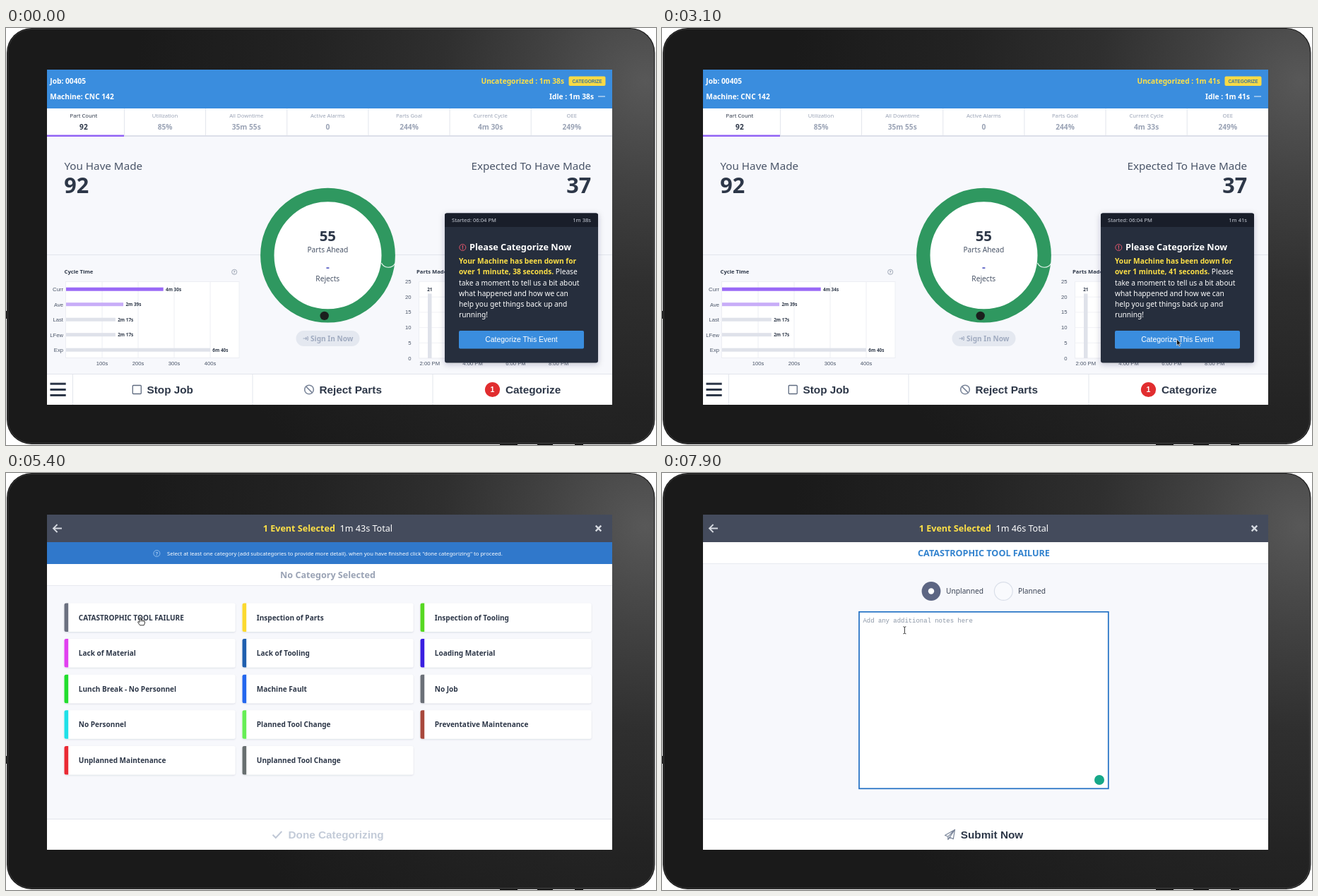
These frames come from a looping animation (920x591 px, 8000 ms). An HTML page:

```html
<!DOCTYPE html>
<html lang="en">
<head>
<meta charset="utf-8">
<title>Machine downtime panel</title>
<style>
  html, body { margin: 0; width: 100%; height: 100%; overflow: hidden; background: #fff; }
  svg { display: block; width: 920px; height: 591px; }
  text { font-family: "Noto Sans", "Open Sans", sans-serif; white-space: pre; }
  .sans { font-family: "Liberation Sans", Arial, sans-serif; }
  .mono { font-family: "Liberation Mono", "Courier New", monospace; }
</style>
</head>
<body>
<svg id="stage" viewBox="0 0 920 591" xmlns="http://www.w3.org/2000/svg"></svg>
<script>
const LOOP = 8000;
const AT = { loader: 3600, list: 4150, notes: 5900, focus: 7150, badge: 7450 };
const INK = '#2d3748', SLATE = '#4a5568', PALE = '#9aa3b5', BLUE = '#3a8dde', YELLOW = '#fde047';
const RULE = '#e2e5ec', BACK = '#f7f8fc';

// Shape helpers
const rect = (x, y, x2, y2, fill, extra = '') =>
  `<rect x="${x}" y="${y}" width="${x2 - x}" height="${y2 - y}" fill="${fill}" ${extra}/>`;
const dot = (x, y, r, fill, extra = '') => `<circle cx="${x}" cy="${y}" r="${r}" fill="${fill}" ${extra}/>`;
const line = (d, stroke, w = 1, extra = '') =>
  `<path d="${d}" fill="none" stroke="${stroke}" stroke-width="${w}" ${extra}/>`;
const text = (x, y, s, size, fill, o = {}) =>
  `<text x="${x}" y="${y}" font-size="${size}" fill="${fill}" font-weight="${o.w || 400}"` +
  ` text-anchor="${o.a || 'start'}" class="${o.f || ''}"${o.k ? ` data-k="${o.k}"` : ''}>${s}</text>`;
const group = (id, body) => `<g id="${id}">${body}</g>`;
const bold = { w: 700 }, mid = { a: 'middle' }, end = { a: 'end' };
const boldMid = { w: 700, a: 'middle' }, boldEnd = { w: 700, a: 'end' };
const sansBold = { w: 700, f: 'sans' };

const defs = `<defs>
  <radialGradient id="bezel" gradientUnits="userSpaceOnUse" cx="905" cy="75" r="720">
    <stop offset="0" stop-color="#585858"/><stop offset=".2" stop-color="#424242"/>
    <stop offset=".4" stop-color="#2f2f2f"/><stop offset=".65" stop-color="#232323"/>
    <stop offset="1" stop-color="#1a1a1a"/>
  </radialGradient>
  <linearGradient id="rim" x1="0" x2="1"><stop offset="0" stop-color="#3a3a3a"/><stop offset="1" stop-color="#4c4c4c"/></linearGradient>
  <filter id="soft" x="-20%" y="-20%" width="140%" height="140%">
    <feDropShadow dx="0" dy="1" stdDeviation="1" flood-color="#1a2440" flood-opacity=".13"/></filter>
  <filter id="deep" x="-20%" y="-20%" width="140%" height="140%">
    <feDropShadow dx="0" dy="2" stdDeviation="4" flood-color="#1a2440" flood-opacity=".25"/></filter>
  <clipPath id="screen"><rect x="58" y="59" width="800" height="475"/></clipPath>
</defs>`;

function tablet() {
  return [[699, 724], [752, 774], [805, 817]].map(([a, b]) => rect(a, 588, b, 591, '#161616')).join('') +
    rect(0, 401, 2, 412, '#222') +
    rect(1, 0, 918.5, 590, '#151515', 'rx="35"') +
    rect(2.5, 1.5, 917, 588.5, 'url(#bezel)', 'rx="33.5" stroke="url(#rim)"');
}

function footer(body) {
  return rect(58, 490, 858, 534, '#fff') + line('M58 490.5H858', RULE) + body;
}

const helpIcon = (x, y, r, c) => dot(x, y, r, 'none', `stroke="${c}" stroke-width=".8"`) +
  text(x, y + r * .6, '?', r * 1.6, c, boldMid);

function tabs() {
  const items = [['Part Count', '92'], ['Utilization', '85%'], ['All Downtime', '35m 55s'], ['Active Alarms', '0'],
    ['Parts Goal', '244%'], ['Current Cycle', '', 'cycle'], ['OEE', '249%']];
  return rect(58, 114, 858, 153, '#fff') + rect(58, 152, 858, 154, '#dcdfe9') +
    items.map(([name, val, k], i) => {
      const x = 109.9 + i * 115.15;
      return (i ? line(`M${x - 57.6} 114V152`, RULE) : '') +
        text(x, 127, name, 7.7, i ? PALE : INK, { w: 500, a: 'middle' }) +
        text(x, 144, val, 10.2, i ? PALE : INK, { w: i ? 600 : 700, a: 'middle', k });
    }).join('') + rect(58, 151.5, 167, 154, '#9163f5');
}

const secX = s => 85 + s * .51;

function cycleChart() {
  const rows = [['Curr', 270, '#9a69f6', ''], ['Ave', 159, '#c8adf8', '2m 39s'], ['Last', 137, '#dfe2ea', '2m 17s'],
    ['LFew', 137, '#dfe2ea', '2m 17s'], ['Exp', 400, '#dfe2ea', '6m 40s']];
  return text(82.5, 348, 'Cycle Time', 7.66, INK, bold) + helpIcon(323.2, 345.8, 3.6, '#8a93a5') +
    rect(84.5, 359.5, 330, 467.5, '#fff', `stroke="#eceef3"`) +
    [100, 200, 300, 400].map(s => line(`M${secX(s)} 359V468`, '#eceef3') +
      text(secX(s), 477.5, s + 's', 7.66, SLATE, { a: 'middle', f: 'sans' })).join('') +
    rows.map(([name, s, c, label], i) => {
      const y = 370.2 + i * 21.5;
      return text(81, y + 2.8, name, 7.66, SLATE, { a: 'end', f: 'sans' }) +
        rect(85, y - 2.5, secX(s), y + 2.5, c, i ? '' : 'id="curBar"') +
        text(secX(s) + 3.3, y + 2.4, label, 6.4, INK, { w: 700, k: i ? '' : 'cur' });
    }).join('');
}

function partsChart() {
  const axis = { a: 'end', f: 'sans' };
  return text(581, 348, 'Parts Made', 7.66, INK, bold) + rect(584.5, 359.5, 829, 468, '#fff', 'stroke="#eceef3"') +
    [25, 20, 15, 10, 5, 0].map((n, i) => text(573.5, 362 + i * 21.7, n, 7.66, SLATE, axis) +
      line(`M584.5 ${359.5 + i * 21.7}H829`, '#f1f2f6')).join('') +
    rect(597, 376.5, 602.5, 468, '#dfe2ea') + text(599.8, 373, '21', 6.4, INK, boldMid) +
    [2, 4, 6, 8].map((h, i) => text(599.8 + i * 60.8, 478.3, h + ':00 PM', 7.66, SLATE, { a: 'middle', f: 'sans' })).join('');
}

function gauge() {
  return dot(455.5, 322.2, 85.7, '#fff', 'stroke="#2f9860" stroke-width="19.4"') +
    line('M531.5 333Q534 339 541 339.3Q548 339 550.3 334', '#e8f5ee', 1.1) +
    dot(450.7, 407.9, 6.2, '#1b1f1d') +
    text(455.3, 302, '55', 20.4, INK, boldMid) + text(455.3, 318.4, 'Parts Ahead', 10.2, SLATE, mid) +
    text(455.3, 343.5, '-', 15, '#5a5fc4', boldMid) + text(455.3, 359.2, 'Rejects', 10.2, SLATE, mid) +
    rect(410.5, 429, 500.5, 451, '#e4e8f0', 'rx="11"') +
    line('M420.5 440H424.5M424.5 438.2V441.8L426.3 440ZM426 437.6H427.3V442.4H426', '#a0abc0', 1) +
    text(431, 443.7, 'Sign In Now', 10.1, '#a0abc0', { w: 600 });
}

function popup() {
  const rows = ['take a moment to tell us a bit about', 'what happened and how we can',
    'help you get things back up and', 'running!'];
  return rect(621, 262.5, 838, 474.5, '#252d3c', 'rx="3" filter="url(#deep)"') +
    `<path d="M621 282V265.5a3 3 0 0 1 3-3H835a3 3 0 0 1 3 3V282Z" fill="#191e2a"/>` +
    text(631, 275.2, 'Started: 06:04 PM', 7.6, '#c9ced8') + text(828, 275.2, '', 7.6, '#c9ced8', { a: 'end', k: 'down' }) +
    dot(646.3, 311, 4.5, 'none', 'stroke="#e0566b"') + text(646.3, 314, '!', 8, '#e0566b', boldMid) +
    text(656, 314.8, 'Please Categorize Now', 12.7, '#fff', bold) +
    text(641, 334, 'Your Machine has been down for', 10.2, YELLOW, bold) +
    `<text x="641" y="349.2" font-size="10.2"><tspan data-k="long" fill="${YELLOW}" font-weight="700"></tspan>` +
    `<tspan fill="#fff"> Please</tspan></text>` +
    rows.map((s, i) => text(641, 364.5 + i * 15.25, s, 10.2, '#fff')).join('') +
    rect(641, 429, 818, 454.5, BLUE, 'rx="2"') +
    text(729.5, 445, 'Categorize This Event', 10.45, '#fff', { a: 'middle', f: 'sans' });
}

function dashboard() {
  return rect(58, 59, 858, 534, BACK) + rect(58, 59, 858, 114, BLUE) +
    text(62.3, 79, 'Job: 00405', 10.2, '#fff', bold) + text(62.3, 100.8, 'Machine: CNC 142', 10.2, '#fff', bold) +
    text(790, 79, '', 10.2, YELLOW, { ...boldEnd, k: 'uncat' }) + text(832, 100.8, '', 10.2, '#fff', { ...boldEnd, k: 'idle' }) +
    rect(796.5, 68.5, 848.5, 82, '#f8da46', 'rx="2"') +
    text(822.5, 77.5, 'CATEGORIZE', 6.5, '#3c759c', { w: 700, a: 'middle', f: 'sans' }) +
    line('M838 97H848', '#cfe3f8', 1.2) + tabs() + line('M58 321.5H858', RULE) +
    text(82.5, 200.6, 'You Have Made', 15.2, SLATE) + text(82.3, 234, '92', 30.6, INK, bold) +
    text(828.2, 200.6, 'Expected To Have Made', 15.2, SLATE, end) + text(828.3, 234, '37', 30.6, INK, boldEnd) +
    cycleChart() + partsChart() + gauge() + popup() +
    footer(
      line('M94.5 491V534M349 491V534M604 491V534', RULE) +
      line('M62.5 504.3H84.7M62.5 512.4H84.7M62.5 520.4H84.7', INK, 3) +
      rect(179.3, 506.5, 191.3, 518.5, 'none', 'rx="1" stroke="#5f6b80" stroke-width="1.3"') +
      text(199.5, 517.5, 'Stop Job', 15.3, INK, sansBold) +
      dot(429, 512.5, 6.3, 'none', 'stroke="#7b869a" stroke-width="1.6"') + line('M424.6 508.1L433.4 516.9', '#7b869a', 1.6) +
      text(443.5, 517.5, 'Reject Parts', 15.3, INK, sansBold) +
      dot(688.5, 512.5, 10.6, '#e12d2f') + text(688.5, 516.3, '1', 10.5, '#fff', { ...sansBold, a: 'middle' }) +
      text(707, 517.5, 'Categorize', 15.3, INK, sansBold));
}

function loader() {
  let dots = '';
  for (let i = 0; i < 8; i++) {
    const a = (i * 45 - 90) * Math.PI / 180;
    if (i !== 1) dots += dot(455.3 + 16.4 * Math.cos(a), 297.3 + 16.4 * Math.sin(a), 3.8, '#a482fb');
  }
  return rect(58, 59, 858, 534, '#fefefe') + group('spin', dots);
}

function topBar() {
  return rect(58, 59, 858, 98, '#444b5c') +
    line('M79 78.5H67.5M72.6 73L67 78.5L72.6 84', '#d5d9e0', 1.8) +
    line('M834.7 74.7L842.3 82.3M842.3 74.7L834.7 82.3', '#d5d9e0', 2.4) +
    text(363.7, 83, '1 Event Selected', 12.6, YELLOW, bold) + text(472.5, 83, '', 12.6, '#fff', { w: 500, k: 'total' });
}

const cards = [['CATASTROPHIC TOOL FAILURE', '#6b7080'], ['Inspection of Parts', '#fbd92f'], ['Inspection of Tooling', '#57d822'],
  ['Lack of Material', '#e040f0'], ['Lack of Tooling', '#1f5fae'], ['Loading Material', '#3a1fe0'],
  ['Lunch Break - No Personnel', '#22dd2e'], ['Machine Fault', '#2467ee'], ['No Job', '#6b7078'],
  ['No Personnel', '#1fe0e8'], ['Planned Tool Change', '#66ee55'], ['Preventative Maintenance', '#a8483c'],
  ['Unplanned Maintenance', '#ea2a34'], ['Unplanned Tool Change', '#686f70']]
  .map(([name, color], i) => ({ name, color, x: 82.5 + i % 3 * 252, y: 184.5 + Math.floor(i / 3) * 50.6 }));

function list() {
  return rect(58, 59, 858, 534, BACK) + topBar() + rect(58, 98, 858, 129, '#3078cb') +
    helpIcon(213.4, 114, 4.5, '#a5cdf5') +
    text(465.4, 116.5, 'Select at least one category (add subcategories to provide more detail). when you have finished click "done categorizing" to proceed.',
      7.66, '#fff', { w: 500, a: 'middle' }) +
    rect(58, 129, 858, 159, '#fff') + line('M58 159.5H858', '#e8eaf0') +
    text(455.5, 148.6, 'No Category Selected', 12.6, PALE, boldMid) +
    cards.map(c => rect(c.x, c.y, c.x + 242, c.y + 40.5, '#fff', 'rx="2.5" filter="url(#soft)"') +
      `<path d="M${c.x + 5.7} ${c.y}v40.5h-3.2a2.5 2.5 0 0 1-2.5-2.5v-35.5a2.5 2.5 0 0 1 2.5-2.5z" fill="${c.color}"/>` +
      text(c.x + 20.3, c.y + 24, c.name, 10.05, INK, { w: 600 })).join('') +
    footer(line('M377.5 512.8L381.8 517L390.3 508', '#c0c8d6', 2) +
      text(399.5, 517.5, 'Done Categorizing', 15.3, '#c3cbd8', sansBold));
}

function notes() {
  return rect(58, 59, 858, 534, BACK) + topBar() + rect(58, 98, 858, 128, '#fff') + line('M58 128.5H858', '#e8eaf0') +
    text(455.5, 118, 'CATASTROPHIC TOOL FAILURE', 12.6, '#3182ce', boldMid) +
    dot(381, 167.5, 13.4, '#5d6683') + dot(381, 167.5, 4.2, '#fff') +
    dot(483.3, 167.5, 12.9, '#f9fafd', 'stroke="#dadfe9" stroke-width="1.2"') +
    text(402, 171, 'Unplanned', 10.2, '#3a4354') + text(504, 171, 'Planned', 10.2, '#3a4354') +
    rect(279, 196.8, 631.8, 447.3, '#fff', 'id="area" stroke="#d5d9e2"') +
    text(284.5, 212, 'Add any additional notes here', 8.93, '#8b96a6', { f: 'mono' }) +
    group('badge', dot(619, 435, 7, '#16a888')) +
    footer(line('M400.5 513.5L414.5 505.5L412.3 518.6L407 516.3L404.8 519.6V515.3ZM404.8 515.3L414.5 505.5L407 516.3', '#7b869a', 1.2, 'stroke-linejoin="round"') +
      text(422.8, 517.5, 'Submit Now', 15.3, INK, sansBold));
}

// Pointers, drawn with the hot spot at 0,0
const pointers =
  group('arrow', `<path d="M0 0V8.9L2.1 7L3.5 10.2L5 9.6L3.6 6.4H6.3Z" fill="#111" stroke="#fff" stroke-width=".7"/>`) +
  group('hand', `<path d="M-1 1Q0-.6 1 1V4.2Q2.2 3.4 3 4.4Q4.2 3.8 4.8 4.9Q6.4 4.5 6.4 6V8.5L5.2 11.3H-.4L-3.2 7.4Q-3.6 5.8-2.2 6L-1 7.2Z" fill="#fff" stroke="#222" stroke-width=".9"/>` +
    line('M1 4V6.5M3 4.5V6.5M4.8 5V6.8', '#222', .6)) +
  group('beam', line('M-2-5Q0-5 0-4Q0-5 2-5M0-4V4M-2 5Q0 5 0 4Q0 5 2 5', '#222', .9));

const pages = { dashboard, loader, list, notes };
const stage = document.getElementById('stage');
stage.innerHTML = defs + tablet() + `<g clip-path="url(#screen)">` +
  Object.entries(pages).map(([id, make]) => group(id, make())).join('') + group('cursor', pointers) + '</g>';

const el = id => document.getElementById(id);
const show = (id, on) => el(id).setAttribute('display', on ? 'inline' : 'none');
const put = (k, s) => stage.querySelectorAll(`[data-k="${k}"]`).forEach(n => {
  if (n.textContent !== s) n.textContent = s;
});
const clock = s => `${Math.floor(s / 60)}m ${s % 60}s`;

// Pointer path: start, end, from x, y, to x, y, upward bend
const moves = [
  [750, 1600, 862, 400, 726, 438, 0],
  [2250, 2600, 726, 438, 728.5, 441, 0],
  [4210, 5065, 728.5, 441, 190, 204.5, 9],
  [6450, 7050, 190, 204.5, 343.4, 222.8, 0]
];

function pointerAt(t) {
  const m = moves.filter(v => t >= v[0]).pop() || moves[0];
  const u = Math.min(1, Math.max(0, (t - m[0]) / (m[1] - m[0]))), e = u * u * (3 - 2 * u);
  return [m[2] + (m[4] - m[2]) * e, m[3] + (m[5] - m[3]) * e - m[6] * 4 * u * (1 - u)];
}

function draw(t) {
  const page = t < AT.loader ? 'dashboard' : t < AT.list ? 'loader' : t < AT.notes ? 'list' : 'notes';
  for (const id in pages) show(id, id === page);

  const ticks = Math.floor((t + 200) / 1000), down = 98 + ticks, cur = 270 + Math.floor((t + 900) / 1000);
  put('uncat', 'Uncategorized : ' + clock(down));
  put('idle', 'Idle : ' + clock(down));
  put('down', clock(down));
  put('long', `over 1 minute, ${down - 60} seconds.`);
  put('total', clock(down) + ' Total');
  put('cycle', clock(270 + ticks));
  put('cur', clock(cur));
  el('curBar').setAttribute('width', secX(cur) - 85);
  stage.querySelector('[data-k="cur"]').setAttribute('x', secX(cur) + 3.3);

  // The spinner turns in eighths from the moment it appears
  el('spin').setAttribute('transform', `rotate(${Math.floor((t - AT.loader) / 125) * 45} 455.3 297.3)`);

  const focus = t >= AT.focus;
  el('area').setAttribute('stroke', focus ? '#2170c4' : '#d5d9e2');
  el('area').setAttribute('stroke-width', focus ? 1.7 : 1);
  show('badge', t >= AT.badge);

  const [x, y] = pointerAt(t);
  const onCard = page === 'list' && cards.some(c => x > c.x && x < c.x + 242 && y > c.y && y < c.y + 40.5);
  const inArea = page === 'notes' && x > 279;
  show('cursor', t >= moves[0][0]);
  show('hand', onCard);
  show('beam', inArea);
  show('arrow', !onCard && !inArea);
  el('cursor').setAttribute('transform', `translate(${x.toFixed(2)} ${y.toFixed(2)})`);
}

const start = performance.now();
function frame() {
  draw((performance.now() - start) % LOOP);
  requestAnimationFrame(frame);
}
frame();
</script>
</body>
</html>
```
